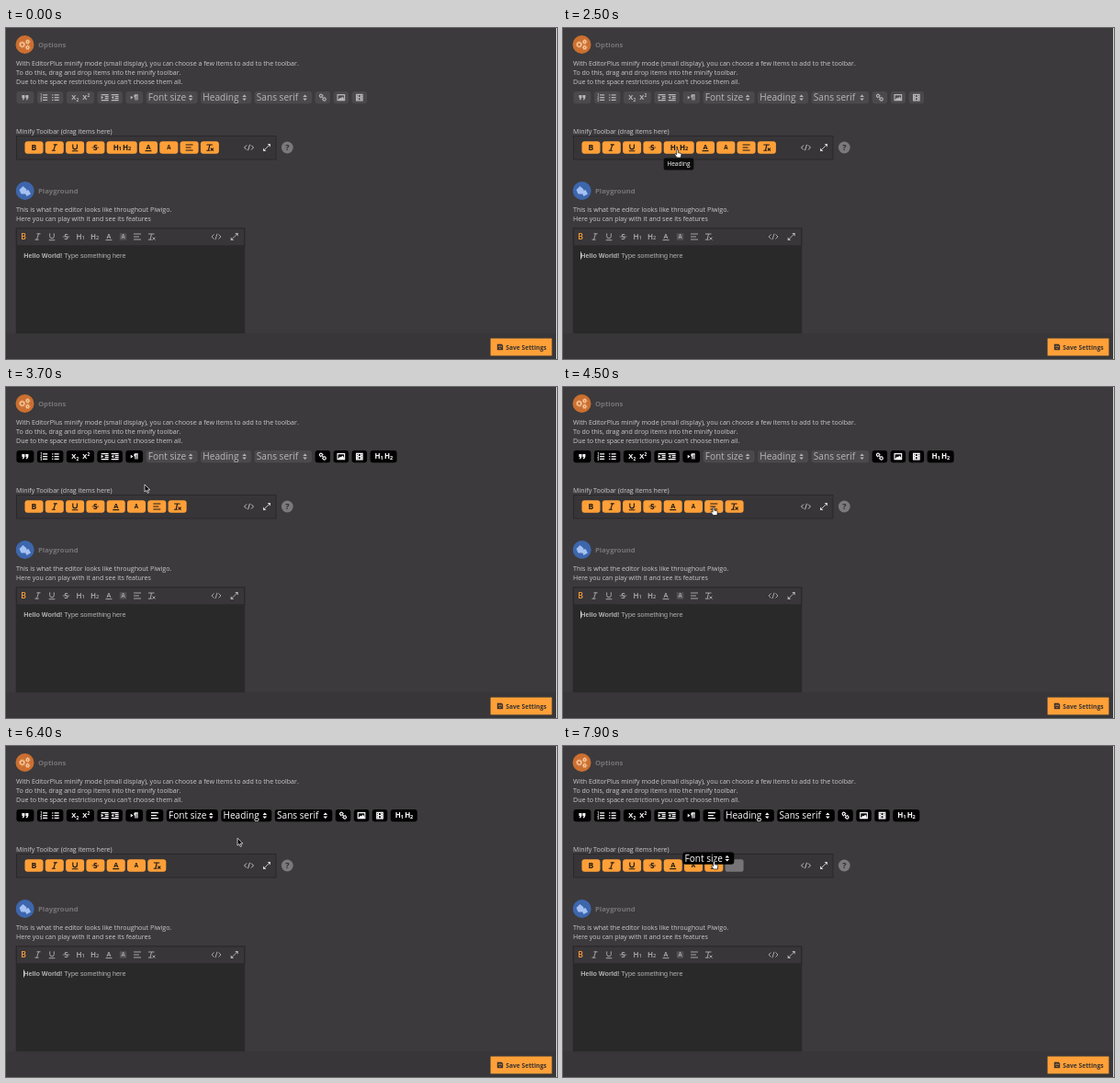
An HTML page that plays this animation: 600 by 360 pixels, repeating every 8 s.

```html
<!DOCTYPE html>
<html lang="en">
<head>
<meta charset="utf-8">
<style>
html, body { margin: 0; width: 100%; height: 100%; overflow: hidden; background: #3c3a3c; }
svg { display: block; font: 7.07px "Open Sans", sans-serif; fill: #cbcacb; }
.head { font-size: 7.7px; font-weight: 700; fill: #777577; }
.edit { font: 7.2px "Liberation Sans", Arial, sans-serif; fill: #b4b3b4; }
.line { fill: none; stroke: currentColor; stroke-width: 1.15; }
.thin .line { stroke-width: .9; }
.solid, .glyph { fill: currentColor; }
.glyph { text-anchor: middle; font-weight: 700; }
.thin .glyph { font-weight: 600; }
.patch { display: none; } .thin .patch { display: inline; }
.bar { color: #1d1a17; } .bar .box { fill: #ff9f38; }
.opt { color: #fff; } .opt .box { fill: #000; }
.dim { color: #b8b7b8; } .dim .box { fill: #4b494b; }
</style>
</head>
<body>
<script>
const LOOP = 8000;

// Icons, drawn around 0,0 in the current colour
const line = d => `<path class="line" d="${d}"/>`;
const solid = d => `<path class="solid" d="${d}"/>`;
const at = (x, y, body) => `<g transform="translate(${x} ${y})">${body}</g>`;
const glyph = (s, size, x = 0, y = 0) =>
  `<text class="glyph" x="${x}" y="${y + size * .36}" font-size="${size}">${s}</text>`;
const heading = n => glyph('H', 8, -1.5) + glyph(n, 5.6, 3, 1);
const rows = 'M-1.5-2.7H3.5M-1.5 0H3.5M-1.5 2.7H3.5';
const indent = d => line('M-4-3H4M0-1H4M0 1H4M-4 3H4') + solid(d);
const select = (label, w) =>
  `<text class="solid" x="${2.2 - w / 2}" y="3.5" font-size="10.1">${label}</text>` +
  at(w / 2 - 7.5, 0, solid('M-2.3-.7L0-3.2 2.3-.7zM-2.3.9L0 3.4 2.3.9z'));

const icons = {
  bold: glyph('B', 8.6),
  italic: line('M-1-3.2H3M-3 3.2H1M1-3.2L-1 3.2'),
  under: line('M-2.3-3.6V-.5a2.3 2.3 0 0 0 4.6 0V-3.6M-3.3 3.7H3.3'),
  strike: `<g font-weight="400">${glyph('S', 8.4)}</g><path d="M-3.8 0H3.8" stroke="currentColor" stroke-width=".7"/>`,
  h1: heading(1),
  h2: heading(2),
  heads: at(-5, 0, heading(1)) + at(5.4, 0, heading(2)),
  color: glyph('A', 7.4, 0, -.8) + line('M-3.5 3.6H3.5'),
  back: `<rect class="solid patch" opacity=".22" x="-3.7" y="-3.7" width="7.4" height="7.4"/>` + glyph('A', 6.2),
  align: line('M-4-3H4M-4 0H2M-4 3H4'),
  clear: line('M-3.5-3H3M0-3L-1.4 3M-3.6 3.2H.2M1 .6l3 3M4 .6l-3 3'),
  quote: [-2, 2].map(x => at(x, 0, solid('M-1.5-2.6h3v2.7L.2 2.6h-1.3L-.3.3H-1.5z'))).join(''),
  lists: at(-6.5, 0, line(rows) + glyph(1, 3.6, -3.4, -2.6) + glyph(2, 3.6, -3.4) + glyph(3, 3.6, -3.4, 2.8)) +
    at(6, 0, line(rows + 'M-4-2.7h1.2M-4 0h1.2M-4 2.7h1.2')),
  scripts: at(-6, 0, glyph('X', 7.6, -1) + glyph(2, 4.8, 3, 2.4)) +
    at(6, 0, glyph('X', 7.6, -1) + glyph(2, 4.8, 3, -2.4)),
  indents: at(-5.5, 0, indent('M-4-1.8v3.6L-1.4 0z')) + at(5.5, 0, indent('M-1.4-1.8v3.6L-4 0z')),
  para: solid('M-4-1.8v3.6L-1.2 0z') + line('M1.2-3V3M3.2-3V3M4-2.8H1') + solid('M1.3-3.3a1.8 1.8 0 0 0 0 3.6z'),
  size: select('Font size', 56),
  title: select('Heading', 55),
  family: select('Sans serif', 62.5),
  link: `<g transform="rotate(45)">${line('M-.8-1.5H-2.7a1.5 1.5 0 0 0 0 3H-.8M.8-1.5H2.7a1.5 1.5 0 0 1 0 3H.8M-2 0H2')}</g>`,
  image: line('M-3.8-3H3.8V3H-3.8z') + solid('M-3 2.3L-1 0 0 1 1.5-1 3 1v1.3z'),
  film: line('M-3.3-3.3H3.3V3.3H-3.3zM-1.5-3.3V3.3M1.5-3.3V3.3M-1.5 0H1.5M-3.3-1h1.5M-3.3 1.2h1.5M3.3-1H1.8M3.3 1.2H1.8'),
  code: line('M-2.5-2.5L-5 0-2.5 2.5M2.5-2.5L5 0 2.5 2.5M1-3.2L-1 3.2'),
  full: line('M-3.4 3.4L3.4-3.4') + solid('M.6-4H4V-.6zM-.6 4H-4V.6z')
};

const widths = { quote: 19, lists: 28.5, scripts: 30, indents: 27.5, para: 18.7, size: 56, title: 55, family: 62.5,
  link: 16.5, image: 16.5, film: 16.5, heads: 29, bold: 18.7, italic: 18.7, under: 18.7, strike: 18.7,
  color: 18.7, back: 18.7, align: 18.7, clear: 18.7 };
const start = {
  opt: ['quote', 'lists', 'scripts', 'indents', 'para', 'size', 'title', 'family', 'link', 'image', 'film'],
  bar: ['bold', 'italic', 'under', 'strike', 'heads', 'color', 'back', 'align', 'clear']
};
const BOX = 13.4;
const rowsAt = { opt: { x: 11.4, y: 68.9, gap: 3.5 }, bar: { x: 20.5, y: 123.3, gap: 2.3 } };

const drags = [
  { id: 'heads', from: 'bar', to: 'opt', index: 11, pick: 2700, over: 3200, drop: 3350 },
  { id: 'align', from: 'bar', to: 'opt', index: 5, pick: 4500, over: 5000, drop: 5200 },
  { id: 'size', from: 'opt', to: 'bar', index: 7, pick: 7350, over: 7750, drop: 8100 }
];
const tips = [
  { text: 'Heading', x: 126, y: 141.6, w: 32.6, from: 2150, to: 2700 },
  { text: 'Font size', x: 203, y: 86.8, w: 34, from: 7100, to: 7350 }
];
// Pointer stops: time, x, y
const path = [
  [1200, 260, 362], [1620, 150, 160], [1750, 149, 159], [2100, 124.6, 132.5], [2700, 124.6, 132.5],
  [3250, 408, 78], [3400, 408, 80], [3700, 151, 106], [4100, 163, 131], [4500, 164, 131],
  [5050, 162, 78], [5200, 162, 80], [5400, 162.5, 95], [5800, 182, 112], [6300, 255, 102],
  [6900, 216, 78], [7200, 214, 77], [7350, 209, 79], [7900, 164.5, 125.5], [8000, 166, 126.5]
];

const text = (x, y, s, cls = '') => `<text x="${x}" y="${y}" class="${cls}">${s}</text>`;
const rect = (x, y, w, h, fill, more = '') =>
  `<rect x="${x}" y="${y}" width="${w}" height="${h}" fill="${fill}" ${more}/>`;
const edge = 'stroke="#2a292a"';
const gear = (x, y, r) => at(x, y,
  `<circle r="${r}" fill="none" stroke="#fbcda2" stroke-width="1.2"/>
   <circle r="${r + 1}" fill="none" stroke="#fbcda2" stroke-width=".9" stroke-dasharray="${(r + 1) * Math.PI / 8}"/>`);
const editorIcons = ['bold', 'italic', 'under', 'strike', 'h1', 'h2', 'color', 'back', 'align', 'clear'];

document.body.innerHTML = `<svg width="600" height="360" viewBox="0 0 600 360">
${rect(0, 0, 600, 360, '#3c3a3c')}
${rect(0, 332, 600, 28, '#383638')}
${rect(599, 0, 1, 360, '#d8d7d8')}
<circle cx="20.5" cy="18" r="10" fill="#cb6f30"/>
${gear(17.6, 18, 2.1)}${gear(23.6, 15, 1.3)}${gear(23.6, 21.2, 1.3)}
${text(35, 21, 'Options', 'head')}
${text(11, 40.7, 'With EditorPlus minify mode (small display), you can choose a few items to add to the toolbar.')}
${text(11, 50.7, 'To do this, drag and drop items into the minify toolbar.')}
${text(11, 60.7, 'Due to the space restrictions you can\'t choose them all.')}
${text(11, 115, 'Minify Toolbar (drag items here)')}
${rect(11.5, 117.5, 282.5, 25.5, '#373537', edge)}
<g color="#d0cfd0" class="thin">${at(264.5, 130, icons.code)}${at(284, 130, icons.full)}</g>
<circle cx="306.3" cy="130" r="6.4" fill="#7b797b"/>
<g color="#302e30">${at(306.3, 130, glyph('?', 9))}</g>
<circle cx="20.7" cy="177" r="10" fill="#3d66ad"/>
<path d="M14.5 176l4-4 4 3.5-1 5h-5zM20 178l4.5-2 2.5 4.5-4.5 2.5z" fill="#a4c1f2"/>
${text(35, 180, 'Playground', 'head')}
${text(11, 199.9, 'This is what the editor looks like throughout Piwigo.')}
${text(11, 209.9, 'Here you can play with it and see its features')}
${rect(11.3, 218, 248.4, 113.7, '#2a292a', edge)}
${rect(11.3, 218, 248.4, 18.8, '#383638', edge)}
<g class="thin" color="#b2b1b2">
${editorIcons.map((id, i) => `<g ${i ? '' : 'color="#ff9f38"'}>${at(19 + i * 15.5, 227, icons[id])}</g>`).join('')}
${at(229, 227, icons.code)}${at(248.7, 227, icons.full)}</g>
<text class="edit" x="19.3" y="250.3"><tspan font-weight="700">Hello World!</tspan> Type something here</text>
${rect(19, 243.5, .8, 8, '#e8e8e8', 'id="caret"')}
${rect(527.6, 337.6, 66.8, 18.8, '#ffa038')}
<g color="#3a3330">${at(538, 347, line('M-2.6-2.6H1.5L2.6-1.5V2.6H-2.6zM-1.3-2.6v1.6H1V-2.6M-1.3 2.6V.6H1.3V2.6'))}
<text class="solid" x="544.3" y="349.5" font-size="6.7" font-weight="700">Save Settings</text></g>
<g id="items"></g>
<g id="tips">${tips.map(p => `<g>${rect(p.x - p.w / 2, p.y, p.w, 12.8, '#0b0b0b', 'rx="2"')}
  <text x="${p.x}" y="${p.y + 8.8}" font-size="6.5" fill="#fff" text-anchor="middle">${p.text}</text></g>`).join('')}</g>
<g id="pointer" stroke-width=".7" stroke-linejoin="round">
<path id="arrow" d="M0 0V8l1.9-1.7 1.3 3 1.3-.6-1.3-2.8H5.8z" fill="#000" stroke="#fff"/>
<path id="hand" d="M-.9.6a.9.9 0 0 1 1.8 0v2.6l2.6.6q.9.3.8 1.3l-.5 3.4h-4.2l-2.7-3.4q.2-1 1.2-.6l1 .7z" fill="#fff" stroke="#111"/>
</g></svg>`;

const $ = id => document.getElementById(id);
const place = (el, x, y) => el.setAttribute('transform', `translate(${x} ${y})`);
const show = (el, on) => el.style.display = on ? '' : 'none';

$('items').innerHTML = rect(0, 0, 20, BOX, '#767476', 'rx="2.5" id="gap"') + Object.keys(widths).map(id =>
  `<g id="${id}"><rect class="box" height="${BOX}" rx="3"/><g>${icons[id]}</g></g>`).join('');

const widthIn = (row, id) => row === 'opt' ? widths[id] : widths[id] < 20 ? 20 : widths[id] + 4;

function pointerAt(t) {
  let i = path.findIndex(p => p[0] > t);
  if (i < 0) i = path.length - 1;
  if (!i) return [-50, -50];
  const [t0, x0, y0] = path[i - 1], [t1, x1, y1] = path[i];
  let k = Math.min(1, (t - t0) / (t1 - t0));
  k = k * k * (3 - 2 * k);
  return [x0 + (x1 - x0) * k, y0 + (y1 - y0) * k];
}

function layout(t) {
  const lists = { opt: [...start.opt], bar: [...start.bar] };
  let held = null, used = 10;
  for (const d of drags) {
    if (t < d.pick) continue;
    const home = lists[d.from].indexOf(d.id);
    lists[d.from].splice(home, 1);
    if (t < d.over) lists[d.from].splice(home, 0, d.id);
    else lists[d.to].splice(d.index, 0, d.id);
    if (t < d.drop) held = d;
    else used -= d.id === 'heads' ? 2 : 1;
  }
  const slots = {};
  for (const row in lists) {
    let { x, y, gap } = rowsAt[row];
    for (const id of lists[row]) {
      const w = held && held.id === id ? 20 : widthIn(row, id);
      slots[id] = { row, x, y, w };
      x += w + gap;
    }
  }
  return { slots, held, used };
}

function draw(t) {
  const [px, py] = pointerAt(t);
  const { slots, held, used } = layout(t);
  let hover = !!held;
  show($('gap'), held);
  for (const id in slots) {
    let { row, x, y, w } = slots[id];
    if (held && held.id === id) {
      place($('gap'), x, y);
      const home = layout(held.pick - 1).slots[id], [gx, gy] = pointerAt(held.pick);
      row = home.row;
      w = home.w;
      x = home.x + px - gx;
      y = home.y + py - gy;
      if ($('items').lastChild !== $(id)) $('items').append($(id));
    }
    const cost = /size|title|family/.test(id) ? 3 : 1;
    const el = $(id);
    el.setAttribute('class', row === 'opt' && used + cost > 10 ? 'dim' : row);
    el.firstChild.setAttribute('width', w);
    place(el, x, y);
    place(el.lastChild, w / 2, BOX / 2);
    hover ||= px > x && px < x + w && py > y && py < y + BOX;
  }
  tips.forEach((p, i) => {
    const fade = Math.min(1, (t - p.from) / 200);
    $('tips').children[i].style.opacity = t < p.from || t > p.to ? 0 : fade;
  });
  show($('caret'), (t + 900) % 1000 < 500);
  place($('pointer'), px, py);
  show($('hand'), hover);
  show($('arrow'), !hover);
}

const began = performance.now();
function tick() {
  draw((performance.now() - began) % LOOP);
  requestAnimationFrame(tick);
}
tick();
</script>
</body>
</html>
```
